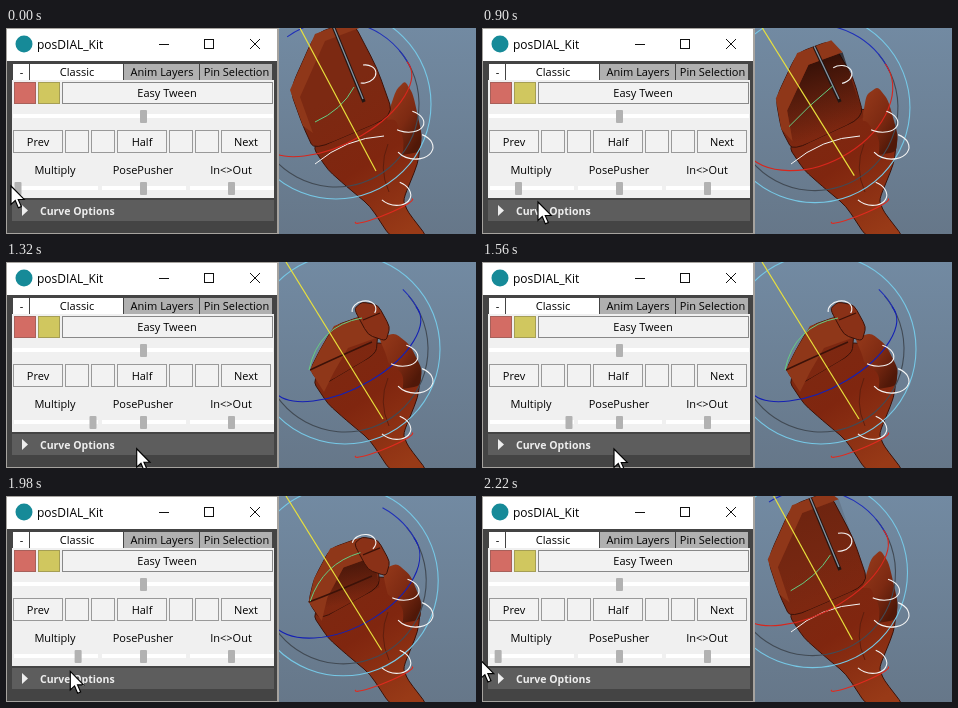
These frames come from a looping animation (470x206 px, 2.28 s). An HTML page with a canvas:

```html
<!DOCTYPE html>
<html lang="en">
<head>
<meta charset="utf-8">
<title>Pose slider</title>
<style>
html, body { margin: 0; width: 100%; height: 100%; overflow: hidden; }
canvas { display: block; }
</style>
</head>
<body>
<canvas id="stage" width="470" height="206"></canvas>
<script>
const c = document.getElementById('stage').getContext('2d');
const LOOP = 2280, STEP = 60;
const EDGE = '#3c1208', CREASE = '#5f1e0d', WHITE = '#f4f4f4';

// Finger outline from the left base over the tips to the right base
const openFingers = [[308, 122], [297, 98], [284, 62], [309, 6], [346, -8], [371, 40], [388, 88]];
const closedFingers = [[316, 124], [304, 108], [314, 88], [328, 64], [356, 54], [372, 70], [370, 92]];

const mix = (a, b, k) => a + (b - a) * k;
const mixPoint = (a, b, k) => [mix(a[0], b[0], k), mix(a[1], b[1], k)];
const progress = (t, from, to) => Math.min(1, Math.max(0, (t - from) / (to - from)));
const smooth = p => p * p * (3 - 2 * p);

// 0 = open hand, 1 = fist
const poseAt = t => progress(t, 660, 1080) ** 2 - smooth(progress(t, 1860, LOOP));

function cursorAt(t) {
  if (t <= 120) return [5 - t / 4, 158];
  const k = Math.sin(progress(t, 660, 1380) * Math.PI / 2) - progress(t, 1560, LOOP) ** 1.5;
  return [mix(-20, 132, k), mix(161, 187, k)];
}

function rect(x, y, w, h, fill, border) {
  c.fillStyle = fill;
  c.fillRect(x, y, w, h);
  if (border) {
    c.strokeStyle = border;
    c.lineWidth = 1;
    c.strokeRect(x + .5, y + .5, w - 1, h - 1);
  }
}

function text(label, x, y, font = '11px', color = '#000', align = 'center') {
  c.font = font + ' "Open Sans", sans-serif';
  c.fillStyle = color;
  c.textAlign = align;
  c.fillText(label, x, y);
}

function stroke(color, width = 1.1) {
  c.strokeStyle = color;
  c.lineWidth = width;
  c.stroke();
}

function line(color, from, to, width = 1) {
  c.beginPath();
  c.moveTo(...from);
  c.lineTo(...to);
  stroke(color, width);
}

function curve(color, from, bend, to, width = 1) {
  c.beginPath();
  c.moveTo(...from);
  c.quadraticCurveTo(...bend, ...to);
  stroke(color, width);
}

function arc(color, x, y, rx, ry, tilt = 0, from = 0, to = Math.PI * 2) {
  c.beginPath();
  c.ellipse(x, y, rx, ry, tilt, from, to);
  stroke(color);
}

function polygon(points, fill) {
  c.beginPath();
  points.forEach(p => c.lineTo(...p));
  c.closePath();
  c.fillStyle = fill;
  c.fill();
}

// Closed shape with slightly rounded corners
function blob(points, fill, edge) {
  const n = points.length;
  c.beginPath();
  points.forEach((p, i) => {
    c.lineTo(...mixPoint(p, points[(i + n - 1) % n], .25));
    c.quadraticCurveTo(...p, ...mixPoint(p, points[(i + 1) % n], .25));
  });
  c.closePath();
  c.fillStyle = fill;
  c.fill();
  if (edge) stroke(edge, 1);
}

function shade(x, y, x2, y2, ...colors) {
  const g = c.createLinearGradient(x, y, x2, y2);
  colors.forEach((color, i) => g.addColorStop(i / (colors.length - 1), color));
  return g;
}

function drawHand(s) {
  const skin = shade(320, 70, 405, 200, '#7c2912', '#80260f', '#983a17');
  const fingers = openFingers.map((p, i) => mixPoint(p, closedFingers[i], s));
  const [base, side, tip, topLeft, topRight, , rightBase] = fingers;

  blob([[306, 118], [322, 142], [340, 158], [364, 178], [385, 210], [422, 210], [402, 184], [397, 172],
    [412, 135], [415, 108], [396, 82], [345, 80]], skin, EDGE);
  blob([[380, 92], mixPoint([390, 62], [373, 76], s), mixPoint([399, 53], [389, 71], s),
    mixPoint([407, 66], [404, 83], s), [416, 107], [414, 124], [390, 128]],
    shade(380, 80, 418, 105, '#8f3518', '#7d2a12', '#501808'));
  blob(fingers, skin, EDGE);
  blob([base, rightBase, [398, 112], [395, 146], [345, 154]], skin);

  // Fingertip band, with the palm falling into shadow as the fingers bend
  const inset = ([x, y]) => [x + mix(10, 14, s), y + mix(7, 22, s)];
  const inner = [side, tip, topLeft, topRight].map(inset);
  const dark = Math.sin(Math.PI * s) * .75;
  polygon([...inner, rightBase, base], shade(...inner[2], ...mixPoint(base, rightBase, .5), `rgba(20,5,2,${dark})`, 'rgba(20,5,2,0)'));
  polygon([side, tip, topLeft, topRight, ...inner.reverse()], '#8f3719');

  if (s > .5) {
    const lift = (1 - s) * 14;
    curve(EDGE, side, [325, 98], [366, 80], 1.5);
    blob([[348, 47], [356, 40], [372, 43], [384, 65], [380, 79], [362, 73]].map(([x, y]) => [x, y + lift / 3]), '#8a3117', EDGE);
    line(EDGE, [357, 58 + lift / 3], [374, 51 + lift / 3], 1.3);
  } else {
    const top = mixPoint(topLeft, topRight, .5);
    line('#241612', top, [358, 74], 3.5);
    line('#8494a4', top, [357, 71], 1.3);
    curve(WHITE, [309, 136], [340, 110], [378, 108]);
  }
  curve(CREASE, [382, 116], [372, 140], [383, 164]);
}

function drawManipulator(s) {
  const x = mix(330, 339, s), y = mix(76, 87, s), fist = s > .6;
  arc('#414a54', x, y, 83, 83, 0, -.7, Math.PI);
  arc('#2030b8', x, y, 83, 83, 0, mix(-2.2, -.8, s), -.45);
  arc('#76c8e6', x, y, 95, 95);
  arc(fist ? '#1420b4' : '#d8261c', x, y, 83, 40 + 22 * Math.sin(Math.PI * s) ** 2, -.49, -.1, Math.PI);
  curve('#66ce82', [mix(309, 303, s), mix(94, 108, s)], [mix(336, 312, s), mix(82, 64, s)], [mix(348, 356, s), mix(59, 56, s)]);
  line('#e9e13c', [294 - 14 * Math.min(1, s * 3), 0], [mix(370, 377, s), mix(143, 157, s)], 1.2);
}

function drawControls(s) {
  arc(WHITE, 358, mix(46, 48, s), 12, 9, -.2, mix(-1.5, -3.1, s), mix(2, .6, s));
  arc(WHITE, mix(400, 394, s), 93, 18, 11, .15, -1.3, 2);
  arc(WHITE, 408, 118, 19, 13, .1, -1.2, 2.5);
  arc(WHITE, 388, 165, 17, 12, .25, -1.4, 2.2);
  arc('#e02a1e', 378, 183, 31, 4, -.39, -.2, Math.PI + .2);
}

function thumb(x, y) {
  c.beginPath();
  c.roundRect(x - 3.5, y - 6.5, 7, 13, 1);
  c.fillStyle = '#b2b2b2';
  c.fill();
}

function drawTitleBar() {
  rect(1, 1, 270, 32, '#fff');
  c.fillStyle = '#168a98';
  c.beginPath();
  c.arc(18, 16, 8.5, 0, 7);
  c.fill();
  text('posDIAL_Kit', 31, 21, '12px', '#000', 'left');
  line('#111', [153, 16.5], [163, 16.5]);
  c.strokeRect(198.5, 11.5, 9, 9);
  line('#111', [244, 11], [254, 21]);
  line('#111', [254, 11], [244, 21]);
}

function drawPanel(slider) {
  rect(0, 0, 273, 206, '#a6a39f');
  rect(1, 1, 270, 204, '#444');
  drawTitleBar();

  let x = 7;
  for (const [label, w] of [['-', 17], ['Classic', 94], ['Anim Layers', 76], ['Pin Selection', 73]]) {
    rect(x, 36, w - 1, 16, x < 100 ? '#fff' : '#b0b0b0');
    text(label, x + w / 2, 48);
    x += w;
  }

  rect(6, 52, 262, 118, '#f0f0f0');
  rect(8, 54, 22, 22, '#d36c64', '#a7605a');
  rect(32, 54, 22, 22, '#d0c75f', '#a59e54');
  rect(56, 54, 211, 22, '#f2f2f2', '#888');
  text('Easy Tween', 161, 69);
  rect(7, 86, 260, 4, '#fff');
  thumb(137.5, 88.5);

  x = 7;
  for (const label of ['Prev', '', '', 'Half', '', '', 'Next']) {
    const w = label ? 50 : 24;
    rect(x, 102, w, 23, '#f2f2f2', '#999');
    text(label, x + w / 2, 118);
    x += w + 2.4;
    x = Math.round(x);
  }

  [['Multiply', slider], ['PosePusher', 137.5], ['In<>Out', 225.5]].forEach(([label, at], i) => {
    text(label, 49 + i * 88, 146);
    rect(8 + i * 88, 158, 84, 4, '#fff');
    thumb(at, 160.5);
  });

  rect(6, 172, 262, 21, '#5d5d5d');
  polygon([[16, 177], [22, 182.5], [16, 188]], '#eee');
  text('Curve Options', 34, 187, 'bold 10.5px', '#eee', 'left');
}

function drawCursor(x, y) {
  c.save();
  c.translate(x, y);
  c.scale(1.15, 1.15);
  polygon([[0, 0], [0, 16], [3.7, 12.6], [6.4, 19], [9, 17.9], [6.3, 11.7], [11.5, 11.7]], '#fff');
  stroke('#000', 1);
  c.restore();
}

function draw(now) {
  const t = Math.floor((now % LOOP) / STEP) * STEP, s = poseAt(t);
  rect(273, 0, 197, 206, shade(0, 0, 0, 206, '#728aa2', '#667789'));
  drawHand(s);
  drawManipulator(s);
  drawControls(s);
  drawPanel(mix(12, 87, s));
  drawCursor(...cursorAt(t));
  requestAnimationFrame(() => draw(performance.now()));
}
draw(0);
</script>
</body>
</html>
```
